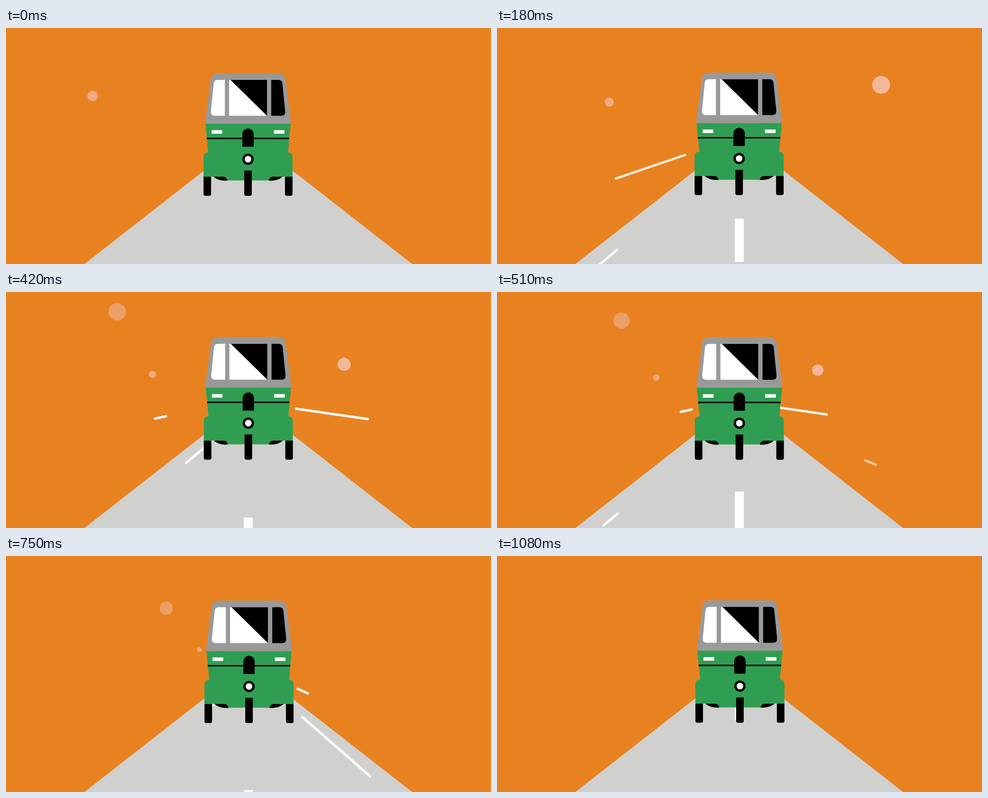
These frames come from a looping animation (1024 by 500 pixels, 1110 ms). An HTML page with a canvas:

```html
<!DOCTYPE html>
<html lang="en">
<head>
<meta charset="utf-8">
<title>Auto rickshaw on the road</title>
<style>
  html, body { margin: 0; width: 100%; height: 100%; overflow: hidden; background: #e88220; }
  canvas { display: block; width: 1024px; height: 500px; }
</style>
</head>
<body>
<canvas id="stage" width="1024" height="500"></canvas>
<script>
const ctx = document.getElementById('stage').getContext('2d');
const LOOP = 1110, STEP = 30, CENTER = 511;
const GREEN = '#2f9e52', GRAY = '#999', BLACK = '#000', WHITE = '#fff';

// Position and radius hold at time `at`; speeds are in px per ms.
const bubbles = [
  { from: 0, at: 0, x: 183, y: 144, r: 11, vx: .3005, vy: .0727, vr: -.008, color: '#f0a982' },
  { from: 120, at: 180, x: 811, y: 120.5, r: 19, vx: -.405, vy: .1365, vr: -.0212, color: '#f4b799' },
  { from: 270, at: 300, x: 197, y: 17, r: 20, vx: .3143, vy: .208, vr: -.0132, color: '#eb9e69' }
];

// Tail (x, y) at time `at`, extent (dx, dy) to the head, constant velocity.
const streaks = [
  { from: 120, at: 180, x: 251, y: 319, dx: 146, dy: -50, vx: 1.02, vy: -.35 },
  { from: 230, at: 300, x: 217.5, y: 287.5, dx: 23, dy: -5, vx: .812, vy: -.16 },
  { from: 100, at: 300, x: 281.5, y: 446, dx: 71, dy: -60, vx: .825, vy: -.7 },
  { from: 400, at: 510, x: 225, y: 494.5, dx: 29, dy: -24.5, vx: .825, vy: -.7 },
  { from: 230, at: 300, x: 703, y: 260.5, dx: 152, dy: 22, vx: -.757, vy: -.11 },
  { from: 468, at: 510, x: 778, y: 356.5, dx: 21, dy: 9.5, vx: -.675, vy: -.3125 },
  { from: 620, at: 750, x: 626, y: 341.5, dx: 143, dy: 125.5, vx: -.65, vy: -.557 }
];

// Small sway of the vehicle: time, x, y.
const sway = [
  [0, 0, 0], [180, .2, -1.5], [300, .6, -.5], [510, .7, 0],
  [750, 2.1, -1.6], [930, 2.7, -2.5], [1080, 1.9, -2.2], [1110, 0, 0]
];

const roof = 'M421 203V195L432 110Q433.500 96 448 96H574Q588.500 96 590 110L601 195V203Z';
const sideWindow = 'M447 110H462V186H441Q432 186 432.500 177L438.500 117Q439.500 110 447 110Z';
const body = 'M421 203H601L595.500 263.500Q605 264 605 274V315H562V323H460V315H417V274Q417 264 427 263.500Z';
const underside = 'M438 315H460Q466 316 467.500 323.500H461Q447 323 438 315Z';

function fillPath(d, color) {
  ctx.fillStyle = color;
  ctx.fill(new Path2D(d));
}

function box(x, y, w, h, color, radii = 0) {
  ctx.fillStyle = color;
  ctx.beginPath();
  ctx.roundRect(x, y, w, h, radii);
  ctx.fill();
}

function disc(x, y, r, color) {
  ctx.fillStyle = color;
  ctx.beginPath();
  ctx.arc(x, y, Math.max(r, 0), 0, Math.PI * 2);
  ctx.fill();
}

function mirrored(draw) {
  ctx.save();
  ctx.translate(2 * CENTER, 0);
  ctx.scale(-1, 1);
  draw();
  ctx.restore();
}

function drawBubble(b, t) {
  if (t < b.from) return;
  const dt = t - b.at;
  disc(b.x + b.vx * dt, b.y + b.vy * dt, b.r + b.vr * dt, b.color);
}

function drawCenterDashes(t) {
  for (let start = 30; start < LOOP; start += 360) {
    const age = t - start;
    const top = 496 - .611 * age, bottom = 618.6 - .82 * age;
    if (top < 500 && bottom > 323) box(502, top, 19, bottom - top, WHITE, 1);
  }
}

function drawStreak(s, t) {
  if (t <= s.from) return;
  const x = s.x + s.vx * (t - s.at), y = s.y + s.vy * (t - s.at);
  ctx.save();
  // Each streak stays on its own side and vanishes behind the vehicle.
  ctx.beginPath();
  ctx.rect(s.vx > 0 ? 166 : CENTER, 0, s.vx > 0 ? CENTER - 166 : 858 - CENTER, 500);
  ctx.clip();
  ctx.globalAlpha = Math.min(1, (t - s.from) / 70);
  ctx.strokeStyle = WHITE;
  ctx.lineWidth = 5;
  ctx.lineCap = 'round';
  ctx.beginPath();
  ctx.moveTo(x, y);
  ctx.lineTo(x + s.dx, y + s.dy);
  ctx.stroke();
  ctx.restore();
}

function swayAt(t) {
  const i = sway.findIndex(key => key[0] > t);
  const a = sway[i - 1], b = sway[i];
  const k = (t - a[0]) / (b[0] - a[0]);
  return [a[1] + (b[1] - a[1]) * k, a[2] + (b[2] - a[2]) * k];
}

function drawVehicle(t) {
  ctx.save();
  ctx.translate(...swayAt(t));

  fillPath(roof, GRAY);
  fillPath(sideWindow, WHITE);
  mirrored(() => fillPath(sideWindow, BLACK));
  box(471, 110, 80, 76, WHITE);
  fillPath('M474 110H551V186Z', BLACK);

  fillPath(body, GREEN);
  const drawSide = () => {
    box(434, 216.5, 22.5, 7.5, WHITE);
    fillPath(underside, BLACK);
    box(417, 315, 16, 40.5, BLACK, [0, 0, 4, 4]);
  };
  drawSide();
  mirrored(drawSide);

  box(424, 232.5, 174, 3, BLACK);
  box(499, 213, 24, 38.5, BLACK, [12, 12, 0, 0]);
  disc(CENTER, 278, 12, BLACK);
  disc(CENTER, 278, 7, WHITE);
  box(503, 302, 16, 53.5, BLACK, [0, 0, 4, 4]);
  ctx.restore();
}

function render(t) {
  ctx.fillStyle = '#e88220';
  ctx.fillRect(0, 0, 1024, 500);
  bubbles.forEach(b => drawBubble(b, t));
  fillPath('M165.500 500L511.500 229L857.500 500Z', '#d0d0ce');
  drawCenterDashes(t);
  streaks.forEach(s => drawStreak(s, t));
  drawVehicle(t);
}

const startTime = performance.now();
function tick() {
  const elapsed = (performance.now() - startTime) % LOOP;
  render(Math.floor(elapsed / STEP) * STEP);
  requestAnimationFrame(tick);
}
tick();
</script>
</body>
</html>
```
